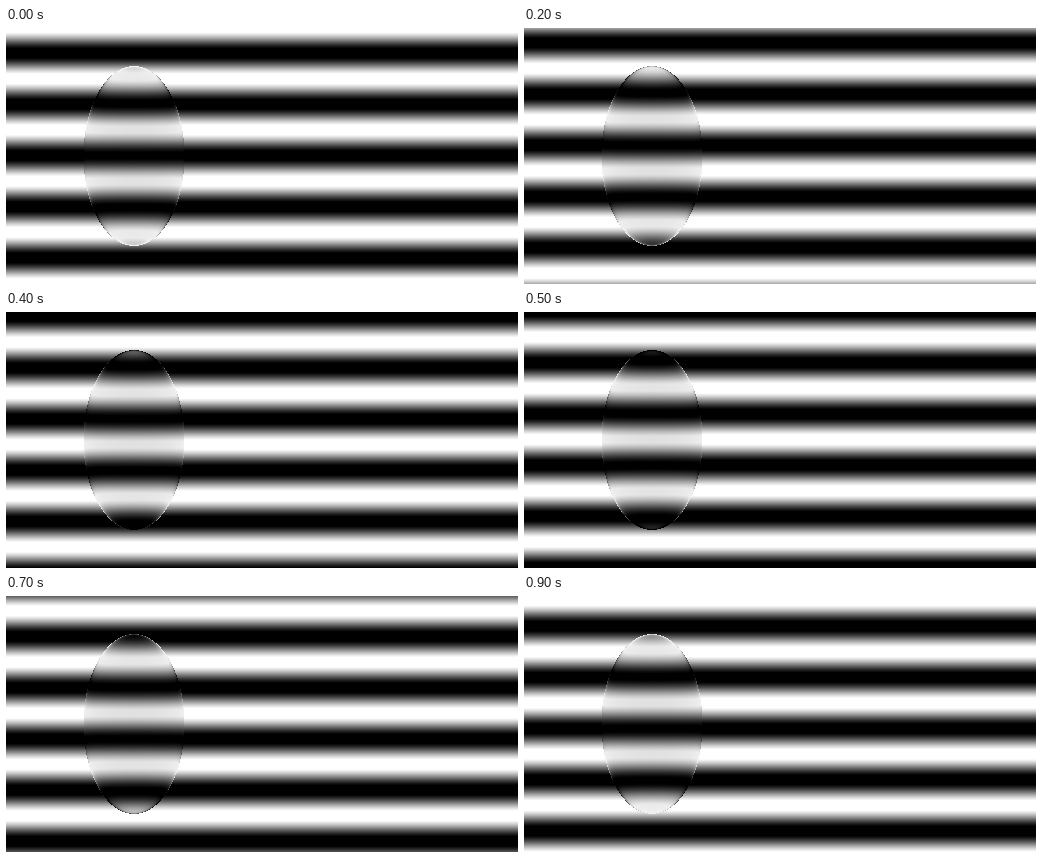
An HTML page with a canvas that plays this animation: 512x256 px, repeating every 1 s.

```html
<!DOCTYPE html>
<html lang="en">
<head>
<meta charset="utf-8">
<title>Drifting stripes behind glass</title>
<style>
  html, body { margin: 0; width: 100%; height: 100%; overflow: hidden; background: #fff; }
  canvas { display: block; width: 512px; height: 256px; }
</style>
</head>
<body>
<canvas id="stage" width="512" height="256"></canvas>
<script>
const W = 512, H = 256;
const LOOP = 1000, STEPS = 10;
const PERIOD = H / 5, DARK_Y = 127;
const CONTRAST = 1.2;
const lens = { x: 127.5, y: 127.5, rx: 50.5, ry: 90, bend: 1, maxShift: 14 };

const ctx = document.getElementById('stage').getContext('2d');
const image = ctx.createImageData(W, H);

// Brightness from 0 to 1, darkest at the stripe centre.
function stripe(y, shift, contrast) {
  const wave = Math.cos((y - DARK_Y + shift) * 2 * Math.PI / PERIOD);
  return Math.min(1, Math.max(0, 0.5 - 0.5 * contrast * wave));
}

// Glass bends the view towards its centre, most strongly at the rim.
function glass(x, y, shift) {
  const nx = (x - lens.x) / lens.rx;
  const ny = (y - lens.y) / lens.ry;
  const depth2 = 1 - nx * nx - ny * ny;
  if (depth2 <= 0) return null;
  const depth = Math.sqrt(depth2);
  const pull = Math.min(lens.maxShift, lens.bend / depth) * ny;
  const tint = 0.95 - 0.07 * depth;
  return tint * stripe(y - pull, shift, 1.08);
}

function draw(step) {
  const shift = step * PERIOD / STEPS;
  const data = image.data;
  for (let y = 0, i = 0; y < H; y++) {
    const plain = stripe(y, shift, CONTRAST);
    for (let x = 0; x < W; x++, i += 4) {
      const v = 255 * (glass(x, y, shift) ?? plain);
      data[i] = data[i + 1] = data[i + 2] = v;
      data[i + 3] = 255;
    }
  }
  ctx.putImageData(image, 0, 0);
}

let shown = -1;
function tick() {
  const step = Math.floor((performance.now() % LOOP) / LOOP * STEPS);
  if (step !== shown) draw(shown = step);
  requestAnimationFrame(tick);
}
tick();
</script>
</body>
</html>
```
